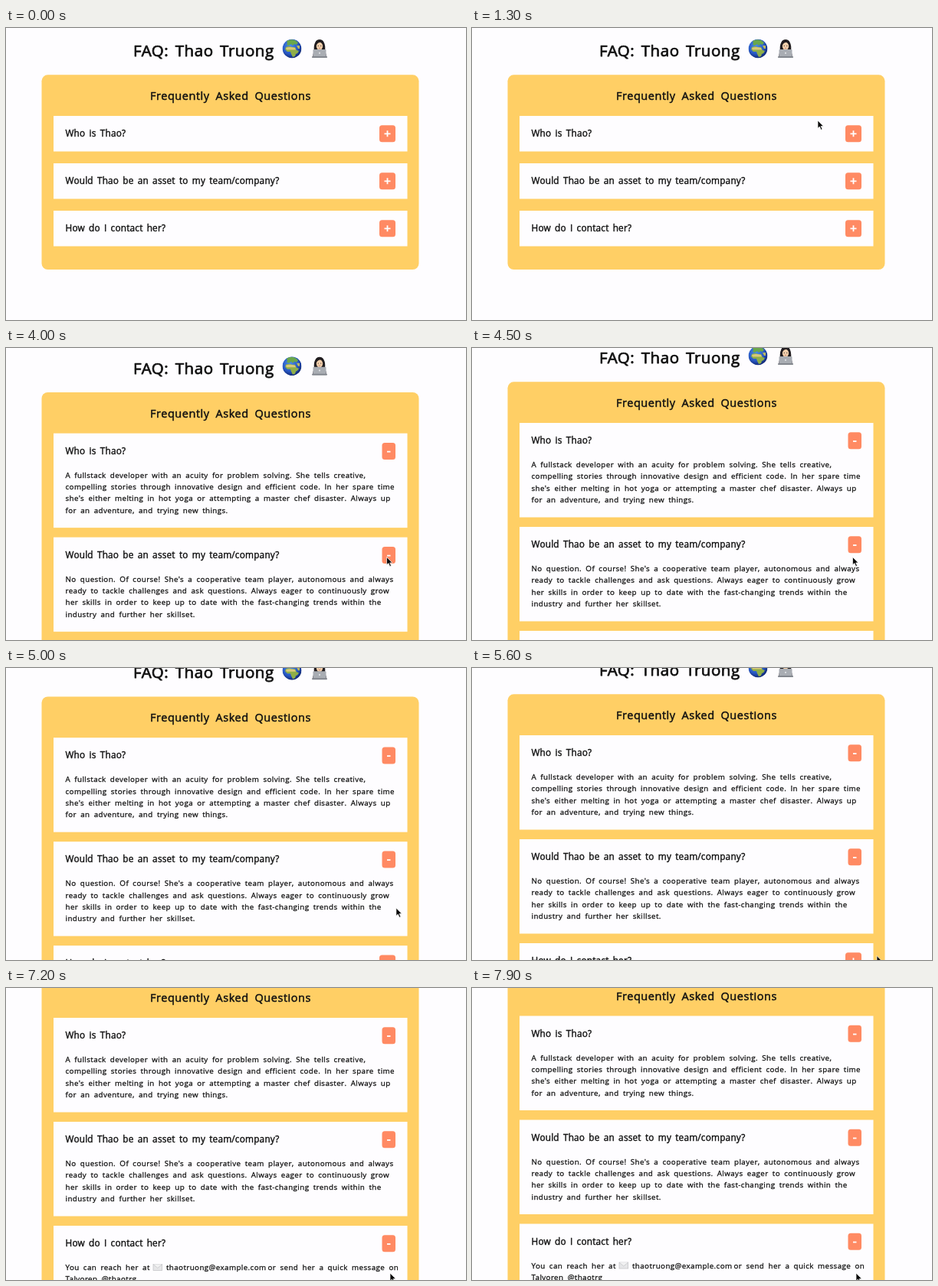
Write an HTML page that moves like this. It is 600 px wide and 382 px high and loops after 8 s.

```html
<!DOCTYPE html>
<html lang="en">
<head>
<meta charset="utf-8">
<title>FAQ accordion</title>
<style>
  html, body { margin: 0; width: 100%; height: 100%; overflow: hidden; background: #fefdff; }
  svg { display: block; width: 100vw; height: 100vh; }
  text {
    font-family: "Open Sans", "Noto Sans", sans-serif;
    fill: #111; stroke: #111; stroke-linejoin: round; white-space: pre;
  }
  .title { font-size: 20.5px; letter-spacing: .55px; word-spacing: 2.5px; stroke-width: .75px; }
  .heading { font-size: 14.5px; letter-spacing: .55px; word-spacing: 3.5px; stroke-width: .5px; }
  .question { font-size: 11.8px; letter-spacing: .2px; word-spacing: 1.9px; stroke-width: .4px; }
  .answer { font-size: 9.8px; letter-spacing: .4px; word-spacing: 2.3px; stroke-width: .28px; }
</style>
</head>
<body>
<svg viewBox="0 0 600 382" preserveAspectRatio="xMidYMid meet">
  <defs>
    <radialGradient id="sea" cx=".4" cy=".35" r=".7">
      <stop offset="0" stop-color="#4a8cec"/>
      <stop offset=".6" stop-color="#2858c4"/>
      <stop offset="1" stop-color="#0d2068"/>
    </radialGradient>
    <clipPath id="disc"><circle r="12.5"/></clipPath>
  </defs>
  <rect width="600" height="382" fill="#fefdff"/>
  <g id="page">
    <text class="title" x="166" y="37">FAQ: Thao Truong</text>

    <g transform="translate(373 27)" clip-path="url(#disc)">
      <circle r="12.5" fill="url(#sea)"/>
      <path d="M-7-10Q-2-13 4-11L8-8 6-5 3-6 1-4-1-6-4-4-7-5-6-7Z" fill="#6aa74c"/>
      <path d="M-8-2Q-4-4 0-2L4-2 6 2 9 3Q8 6 5 7L4 10 1 11-1 7-2 4-6 4-9 1Z" fill="#8fae48"/>
      <path d="M-8-1Q-3-3 4-1L5 1.5-7 1.5Z" fill="#d8c87a"/>
      <path d="M6-4L10-4 10 0 8 0Z" fill="#b9b862"/>
    </g>

    <g transform="translate(409 27)">
      <path d="M-7 3Q-8-4-5.5-8.5-4-12 0-12 4-12 5.5-8.5 8-4 7 3Z" fill="#211d20"/>
      <path d="M-9 11Q-9 3-3 2H3Q9 3 9 11Z" fill="#4f4653"/>
      <ellipse cy="-3.4" rx="4.2" ry="5.2" fill="#f2cfab"/>
      <path d="M-4.6-3Q-4-7.5 1-8.5 4-7.5 4.6-3L5.5-7 3-11H-3L-5.5-7Z" fill="#211d20"/>
      <circle cx="-1.8" cy="-3.6" r=".6" fill="#3c3030"/>
      <circle cx="1.8" cy="-3.6" r=".6" fill="#3c3030"/>
      <path d="M-1.2-.8Q0 0 1.2-.8" fill="none" stroke="#b6655b" stroke-width=".7"/>
      <rect x="-8.5" y="1" width="17" height="10" rx="1" fill="#a9adb3"/>
      <rect x="-10" y="10" width="20" height="2" rx=".8" fill="#83878e"/>
      <circle cy="5.8" r="1.1" fill="#e0e3e6"/>
    </g>

    <rect id="panel" x="46.5" y="61.3" width="492" rx="8" fill="#ffcf65"/>
    <text class="heading" x="188" y="94">Frequently Asked Questions</text>
    <g id="cards"></g>
  </g>
  <path id="cursor" d="M0 0V10.3L2.4 8.1 4.2 12.2 6 11.4 4.2 7.5H7.4Z"
        fill="#080808" stroke="#fff" stroke-width=".7" stroke-linejoin="round"/>
</svg>
<script>
const LOOP = 8000, STEP = 100;
const CLOSED = 46.5, OPEN = 123.5;
const byId = id => document.getElementById(id);

const line = (x, y, words) => `<text class="answer" x="${x}" y="${y}">${words}</text>`;
const paragraph = lines => lines.map((words, i) => line(77.5, 58 + i * 15.4, words)).join("");
const button = (x, width, sign) => `
  <rect x="${x}" y="12.3" width="${width}" height="22" rx="3.5" fill="#ff8a63"/>
  <path d="${sign}" stroke="#fff" stroke-width="1.8"/>`;
const envelope = `
  <g stroke="#b9babd" stroke-width=".6">
    <rect x="192" y="50.5" width="11.7" height="8" fill="#e6e6e8"/>
    <path d="M192 50.5L197.8 55.4 203.7 50.5" fill="#f1f1f2"/>
  </g>`;

const items = [
  {
    question: "Who is Thao?", opensAt: 2200,
    answer: paragraph([
      "A fullstack developer with an acuity for problem solving. She tells creative,",
      "compelling stories through innovative design and efficient code. In her spare time",
      "she's either melting in hot yoga or attempting a master chef disaster. Always up",
      "for an adventure, and trying new things."
    ])
  },
  {
    question: "Would Thao be an asset to my team/company?", opensAt: 3600,
    answer: paragraph([
      "No question. Of course! She's a cooperative team player, autonomous and always",
      "ready to tackle challenges and ask questions. Always eager to continuously grow",
      "her skills in order to keep up to date with the fast-changing trends within the",
      "industry and further her skillset."
    ])
  },
  {
    question: "How do I contact her?", opensAt: 6200,
    answer: paragraph(["You can reach her at", "Talvoren @thaotrg"]) + envelope +
      line(209, 58, "thaotruong@example.com") +
      line(341.5, 58, "or send her a quick message on")
  }
];

byId("cards").innerHTML = items.map(({ question, answer }) => `
  <g>
    <rect class="box" x="62" width="461.5" fill="#fefdff"/>
    <text class="question" x="77.5" y="27">${question}</text>
    <g class="shut">${button(487, 21, "M493.5 23.3H501.5M497.5 19.3V27.3")}</g>
    <g class="open">${button(490.5, 17.5, "M497 24H501.5")}${answer}</g>
  </g>`).join("");

const cards = [...byId("cards").children].map((group, i) => ({
  group,
  opensAt: items[i].opensAt,
  box: group.querySelector(".box"),
  shut: group.querySelector(".shut"),
  open: group.querySelector(".open")
}));

// Keys: [time, ...values], eased between neighbours
const pointer = [
  [500, 530, 304], [1000, 530, 300], [1300, 451, 121], [1500, 452, 121],
  [2000, 497, 138], [2400, 497, 138], [2900, 437.5, 239], [3000, 437.5, 239],
  [3500, 496.5, 273.5], [4700, 496.5, 273.5], [5400, 528, 376.5],
  [5700, 528, 376.5], [6100, 501, 373]
];
const scrolling = [
  [3800, 0], [4500, 17], [5300, 27], [5600, 27], [6000, 27.5],
  [6800, 27.5], [7200, 76], [7600, 78], [7900, 78.5]
];

function sample(keys, t) {
  const next = keys.findIndex(key => key[0] > t);
  if (next === 0) return keys[0].slice(1);
  if (next < 0) return keys[keys.length - 1].slice(1);
  const [from, ...a] = keys[next - 1];
  const [to, ...b] = keys[next];
  const p = (t - from) / (to - from);
  const eased = p * p * (3 - 2 * p);
  return a.map((value, i) => value + (b[i] - value) * eased);
}

const show = (node, on) => node.setAttribute("visibility", on ? "visible" : "hidden");
const move = (node, x, y) => node.setAttribute("transform", `translate(${x} ${y})`);

function draw(t) {
  let y = 115;
  for (const { group, box, shut, open, opensAt } of cards) {
    const isOpen = t >= opensAt;
    move(group, 0, y);
    box.setAttribute("height", isOpen ? OPEN : CLOSED);
    show(shut, !isOpen);
    show(open, isOpen);
    y += isOpen ? 136 : 62;
  }
  byId("panel").setAttribute("height", y + 15 - 61.3);
  move(byId("page"), 0, -sample(scrolling, t)[0]);
  move(byId("cursor"), ...sample(pointer, t));
  show(byId("cursor"), t >= pointer[0][0]);
}

const start = performance.now();
function tick() {
  const t = (performance.now() - start) % LOOP;
  draw(Math.floor(t / STEP) * STEP);
  requestAnimationFrame(tick);
}
tick();
</script>
</body>
</html>
```
